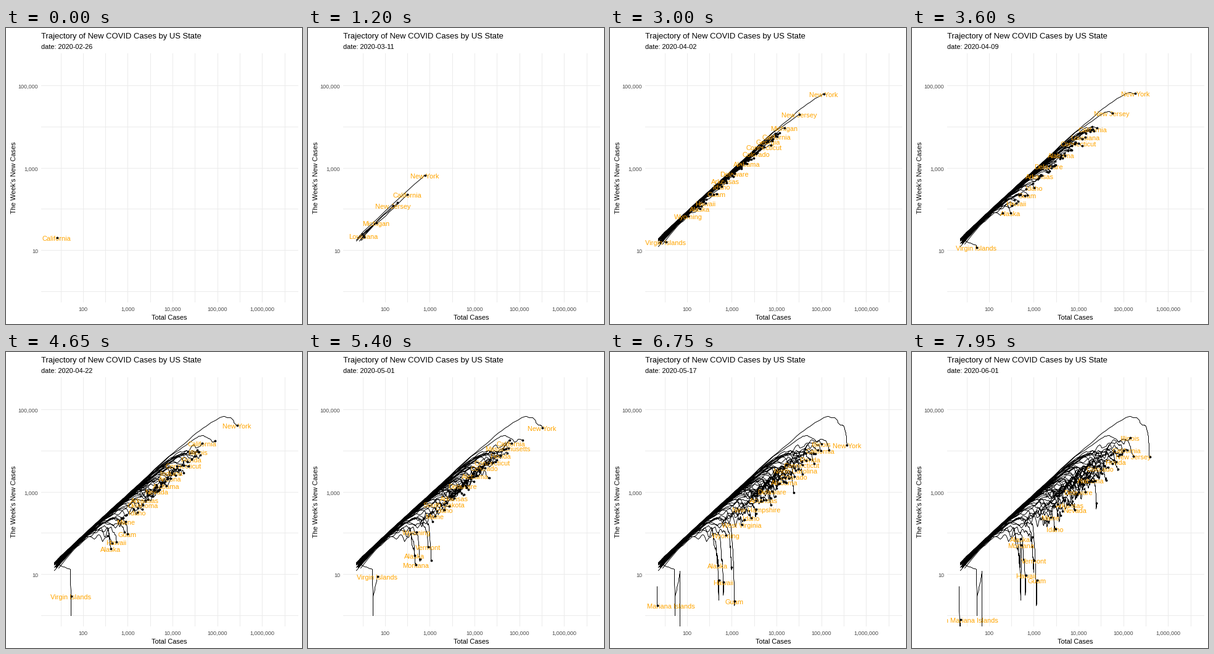
A matplotlib script that plays this animation: 480x480 px, repeating every 8 s.

```python
import numpy as np
import matplotlib.pyplot as plt
from matplotlib.animation import FuncAnimation
from matplotlib.patches import Rectangle

plt.rcParams["font.family"] = ["Liberation Sans"]

SIZE, LAST_DAY, DAYS_PER_STEP = 480, 96, 1.806
DAYS = np.arange(LAST_DAY + 1)


def split(names):
    return [name.strip() for name in names.split(",")]


# Largest outbreak first; the final total follows from the rank.
RANKED = split("""New York, New Jersey, Illinois, California, Massachusetts,
    Pennsylvania, Texas, Michigan, Florida, Maryland, Georgia, Virginia,
    Connecticut, Louisiana, Ohio, Indiana, North Carolina, Colorado, Minnesota,
    Tennessee, Washington, Arizona, Iowa, Wisconsin, Alabama, Mississippi,
    Rhode Island, Nebraska, Missouri, South Carolina, Kentucky, Utah, Kansas,
    Delaware, District of Columbia, Nevada, New Mexico, Arkansas, Oklahoma,
    South Dakota, New Hampshire, Oregon, Puerto Rico, Idaho, North Dakota,
    Maine, West Virginia, Wyoming""")
RANK_LOG10 = ([0, 1, 4, 14, 24, 34, 46, 47],
              [5.58, 5.21, 5.0, 4.57, 4.27, 3.96, 3.31, 2.96])

# Positive pace: grew early and slowed; negative: grew late.
PACE = {name: pace for pace, names in {
    1.4: "New York, Washington",
    0.8: "New Jersey, Michigan, Louisiana, Idaho, Nevada, Oregon",
    -0.8: """Illinois, Maryland, Virginia, Indiana, Minnesota, Iowa, Nebraska,
        Rhode Island, Kansas, North Dakota, South Dakota, Puerto Rico""",
}.items() for name in split(names)}
FIRST_DAY = {"California": 0, "Washington": 4}

# Final total, then day and size of the weekly low, and the last week.
QUIET = {
    "Alaska": (488, 81, 19, 81), "Guam": (1150, 79, 2, 7),
    "Hawaii": (650, 77, 5, 10), "Montana": (515, 75, 3, 45),
    "Vermont": (985, 81, 14, 21),
}
# Key points as (day, total, week); 0.1 falls off the panel.
SPARSE = {
    "Northern Mariana Islands": [(76, 21, 5.2), (81, 21, 2), (88, 22, 0.1),
                                 (93, 22, 0.1), (96, 22.5, 1)],
    "Virgin Islands": [(30, 22, 19), (43, 51, 13.4), (52, 53, 1), (56, 53, 3),
                       (65, 66, 9), (68, 67, 12), (70, 68, 0.1), (96, 70, 0.1)],
}


def to_px(total, week):
    return (125.3 + 72.6 * (np.log10(total) - 2),
            360.7 - 66.7 * (np.log10(week) - 1))


def log_interp(t, times, values):
    return np.exp(np.interp(t, times, np.log(values)))


def hermite(t, t0, t1, p0, p1, m0, m1):
    h = t1 - t0
    u = (t - t0) / h
    return ((1 + 2 * u) * (1 - u)**2 * p0 + u * u * (3 - 2 * u) * p1
            + h * (u * (1 - u)**2 * m0 + u * u * (u - 1) * m1))


def outbreak(name, final, pace, rng):
    """Daily totals and weekly cases of one outbreak that slows down twice."""
    first = 25.5 if name == "California" else 22
    early = final * 0.023 * 2.6**pace
    middle = final * 0.38 * 1.55**pace
    start = FIRST_DAY.get(name, 27 - np.log(early / first) / 0.33)
    times = [start, 27, 56, LAST_DAY]
    values = np.log([first, early, middle, final])
    rate = np.diff(values) / np.diff(times)
    slope = [rate[0], min(rate[0], 2.5 * rate[1]),
             min(np.sqrt(rate[1] * rate[2]), 2.8 * rate[2]),
             rate[2] * (0.65 - 0.18 * pace)]

    def total(t):
        log_total = values[0] + max(rate[0], 0.25) * (t - start)
        for i in range(3):
            piece = hermite(t, *times[i:i + 2], *values[i:i + 2], *slope[i:i + 2])
            log_total = np.where(t >= times[i], piece, log_total)
        return np.exp(log_total)

    days = DAYS[DAYS >= start]
    cases = total(days)
    week = cases - total(days - 7)
    if name in QUIET:
        _, low_day, low, last = QUIET[name]
        week = np.where(days < 56, week, log_interp(
            days, [56, low_day, LAST_DAY], [week[days == 56][0], low, last]))
    noise = np.convolve(rng.normal(size=LAST_DAY + 5), [0.4, 0.6, 0.6, 0.4, 0.2],
                        "valid")[days]
    size = np.clip((5.6 - np.log10(cases)) / 1.6, 0.12, 1)
    wobble = 0.17 * (1 - week / cases) * size * noise
    dip = 0.22 * abs(rng.normal()) * np.exp(-(days - start) / 4)
    return days, cases, week * np.exp(wobble - dip * (name not in FIRST_DAY))


def sparse_path(name):
    times, *series = np.array(SPARSE[name]).T
    days = DAYS[DAYS >= times[0]]
    return days, *(log_interp(days, times, values) for values in series)


def build_paths():
    paths = {}
    for i, name in enumerate(sorted([*RANKED, *QUIET, *SPARSE])):
        rng = np.random.default_rng(100 + i)
        if name in SPARSE:
            days, cases, week = sparse_path(name)
        elif name in QUIET:
            days, cases, week = outbreak(name, QUIET[name][0], 1.8, rng)
        else:
            final = 10**np.interp(RANKED.index(name), *RANK_LOG10)
            days, cases, week = outbreak(name, final, PACE.get(name, 0), rng)
        paths[name] = (days, *to_px(cases, week))
    return paths


fig = plt.figure(figsize=(SIZE / 72, SIZE / 72), dpi=72, facecolor="white")
ax = fig.add_axes([0, 0, 1, 1])
ax.set(xlim=(0, SIZE), ylim=(SIZE, 0))
ax.axis("off")
panel = Rectangle((57, 41), 417, 404, transform=ax.transData)


def write(x, y, text, size, color="black", **kw):
    return ax.text(x, y, text, fontsize=size, color=color,
                   **{"va": "baseline", **kw})


def grid_line(xs, ys):
    ax.plot(xs, ys, color="#EBEBEB", lw=1, snap=False, solid_capstyle="butt")


for j in range(-1, 10):
    grid_line([int(125.3 + 36.3 * j) + 0.5] * 2, [41, 445])
for j in range(6):
    grid_line([57, 474], [int(93.7 + 66.7 * j) + 0.5] * 2)
for j in range(5):
    write(125 + 72.6 * j, 459, f"{10**(j + 2):,}", 9, "#4D4D4D", ha="center")
for j in range(3):
    write(52, 98 + 133.4 * j, f"{10**(5 - 2 * j):,}", 9, "#4D4D4D", ha="right")
write(57, 17, "Trajectory of New COVID Cases by US State", 13)
date_text = write(57, 34, "", 11)
write(265, 473, "Total Cases", 11, ha="center")
write(18, 243, "The Week's New Cases", 11, rotation=90, ha="right", va="center")

trails, = ax.plot([], [], color="black", lw=0.95, snap=False, zorder=3)
heads, = ax.plot([], [], "o", color="black", ms=3.8, mew=0, zorder=5)
paths = build_paths()
labels = {name: write(0, 0, name, 11, "#FFA500", ha="center", zorder=4)
          for name in paths}
widths = {name: label.get_window_extent().width for name, label in labels.items()}
for artist in (trails, heads, *labels.values()):
    artist.set_clip_path(panel)
    artist.set_clip_on(True)


def update(frame):
    now = frame // 3 * DAYS_PER_STEP
    date_text.set_text(f"date: {np.datetime64('2020-02-26') + int(round(now))}")
    xs, ys, head_xy, placed = [], [], [], []
    for name, (days, px, py) in paths.items():
        label = labels[name]
        label.set_visible(False)
        if now < days[0]:
            continue
        past = days <= now
        x, y = np.interp(now, days, px), np.interp(now, days, py)
        xs += [*px[past], x, np.nan]
        ys += [*py[past], y, np.nan]
        head_xy.append((x + 0.5, y + 0.5))
        half = widths[name] / 2
        # A label is left out where it would cover one already placed.
        clear = all(abs(x - ox) >= half + oh or abs(y - oy) >= 8.3
                    for ox, oy, oh in placed)
        if clear and y < 450:
            placed.append((x, y, half))
            label.set_position((x, y + 5.5))
            label.set_visible(True)
    # Whole-pixel vertices keep the thin lines crisp.
    trails.set_data(np.round(xs) + 0.5, np.round(ys) + 0.5)
    heads.set_data(*zip(*head_xy))
    return trails, heads, date_text, *labels.values()


anim = FuncAnimation(fig, update, frames=160, interval=50, repeat=True,
                     repeat_delay=0, blit=False)
plt.show()
```
